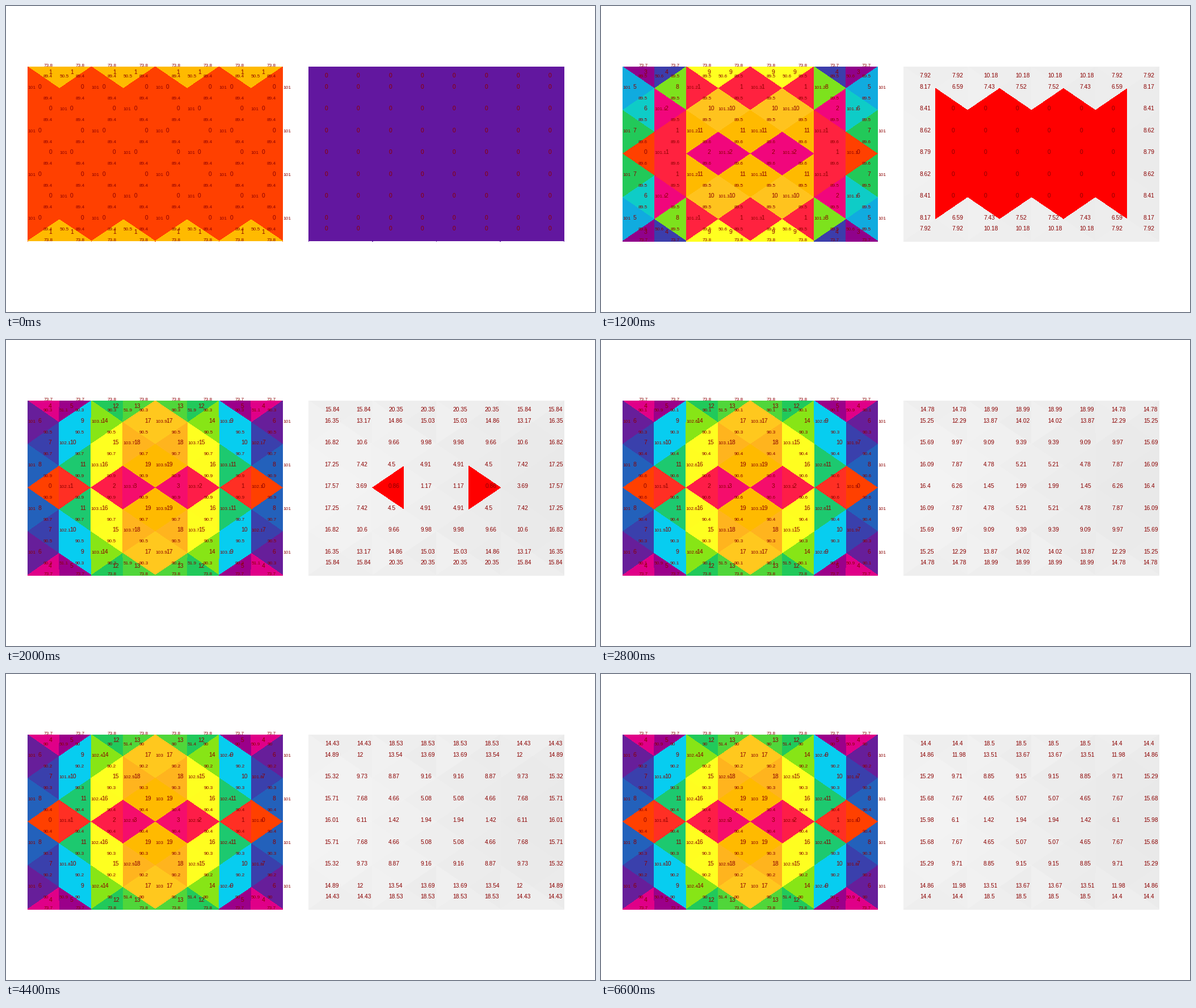
A matplotlib script that plays this animation: 1038 px wide and 540 px high, repeating every 7600 ms.

```python
import numpy as np
import matplotlib.pyplot as plt
from matplotlib.animation import FuncAnimation
from matplotlib.collections import PolyCollection
from matplotlib.colors import LinearSegmentedColormap, to_hex

W, H, DPI = 1038, 540, 64
FRAMES, STEP, LAST = 38, 200, 33
COLS, ROWS = 8, 9
DX, DY = 56.25, 38.5
LEFT, RIGHT, TOP = 38, 533.75, 107.2
INK = "#8b0000"

RAINBOW = LinearSegmentedColormap.from_list("groups", [
    (0, "#ff4000"), (.1, "#ff1f45"), (.2, "#ee0088"), (.27, "#92008a"),
    (.36, "#3d3baa"), (.42, "#245fba"), (.47, "#07cdf0"), (.53, "#07cdf0"),
    (.58, "#1ec96c"), (.64, "#22c958"), (.74, "#8ae614"), (.79, "#ffff20"),
    (.84, "#ffff20"), (.895, "#ffc81e"), (.947, "#ffb41e"), (1, "#ffba00"),
], N=2048)

FACES = [(c, r) for r in range(ROWS) for c in range(COLS)]


def fold(i, n):
    """Index counted from the nearer end."""
    return min(i, n - 1 - i)


def smooth(t):
    t = min(max(t, 0), 1)
    return t * t * (3 - 2 * t)


def settle(i):
    """Overshoot that fades once the mesh has risen."""
    return np.exp(-max(i - 10, 0) / 3)


def relax(i):
    return smooth((i - 5) / 5) * (1 + .45 * settle(i))


def num(v, digits):
    return f"{round(float(v), digits):g}"


def point(line, u, i):
    drift = .9 * np.sin(line * np.pi / 4) * relax(i) if 0 < u < 8 else 0
    return np.array([line * DX - drift, TOP + u * DY])


def lines_of(c):
    """Even and odd grid line beside a column."""
    return (c, c + 1) if c % 2 == 0 else (c + 1, c)


def corners(c, r):
    even, odd = lines_of(c)
    base, tip = (odd, even) if r % 2 == 0 else (even, odd)
    return [(base, max(r - 1, 0)), (base, min(r + 1, 8)), (tip, r)]


def edges(i):
    """Yield midpoint and length of every mesh edge."""
    def mid(a, b):
        return (point(*a, i) + point(*b, i)) / 2

    pull = relax(i)
    for c in range(COLS):
        m = fold(c, COLS)
        short = m < 2 and i >= 2 + 3 * m
        for u in (0, 8):
            yield mid((c, u), (c + 1, u)), 73.7 if short else 73.8
        even, odd = lines_of(c)
        for r in range(8):
            a, b = (r, r + 1) if r % 2 == 0 else (r + 1, r)
            stretch = .007 + .0015 * fold(r, 8)
            yield mid((even, a), (odd, b)), 89.4 * (1 + stretch * pull)
    for line in range(COLS + 1):
        stretch = .02 * np.sin(line * np.pi / 8)
        stops = [0, 1, 3, 5, 7, 8] if line % 2 else [0, 2, 4, 6, 8]
        for a, b in zip(stops, stops[1:]):
            yield (mid((line, a), (line, b)),
                   50.5 * (b - a) * (1 + stretch * pull))


def deviation(c, r, i):
    """Rises along the border first, then from the rim to the centre."""
    m, row = fold(c, COLS), fold(r, ROWS)
    middle = 1 + 2.6 * (m - 2.4) ** 2
    top = 18.5 - 4.1 * (m < 2)
    final = middle + (top - middle) * (1 - row / 4) ** 1.2
    if m == 0 or row < 2:
        growth = smooth((i - 2) / 8)
    else:
        growth = smooth((i - 6) / (4 + 3.5 * (row / 4) ** 4))
    return final * growth * (1 + .1 * settle(i))


def group(c, r, i):
    """Label of a face and the number of groups."""
    m, row = fold(c, COLS), fold(r, ROWS)
    if i < 2:
        return int(row == 0), 2
    if i < 5:
        return (1 + (m > 0) if row == 0 else 0), 3
    if i < 8:
        column = [(3, 5, 6, 7, 0), (4, 8, 2, 1, 1), (9, 1, 10, 11, 2)]
        return column[min(m, 2)][row], 12
    pair, side = divmod(m, 2)
    if row == 4:
        return m, 20
    return 4 + 8 * pair + (side if row == 0 else 1 + 3 * side + row), 20


def height(line, u):
    return np.sin(line * np.pi / 8) * np.sin(u * np.pi / 8) ** .6


def shade(c, r, v, i):
    if i == 0:
        return "#62179f"
    if v < 1:
        return "#ff0000"
    (b, u0), (_, u1), (t, u2) = corners(c, r)
    z0, z1 = height(b, u0), height(b, u1)
    at_tip = z0 + (z1 - z0) * (u2 - u0) / (u1 - u0)
    slope = (height(t, u2) - at_tip) / (t - b)
    return to_hex([(238 + 14 * slope * min(i / 10, 1)) / 255] * 3)


fig = plt.figure(figsize=(W / DPI, H / DPI), dpi=DPI, facecolor="white")
ax = fig.add_axes([0, 0, 1, 1])
ax.set_xlim(0, W)
ax.set_ylim(H, 0)
ax.axis("off")


def mesh():
    return ax.add_collection(
        PolyCollection([], linewidths=0, antialiaseds=False, zorder=1))


def labels(n, px):
    return [ax.text(0, 0, "", fontsize=px * 72 / DPI, color=INK, zorder=2,
                    family="Liberation Sans", ha="left", va="baseline")
            for _ in range(n)]


groups, shades = mesh(), mesh()
edge_text = labels(len(list(edges(0))), 8.2)
group_text = labels(len(FACES), 10.4)
dev_text = labels(len(FACES), 10.3)


def paint(coll, polys, colors):
    coll.set_verts(polys)
    coll.set_facecolor(colors)


def put(text, x, y, s):
    text.set_position((x, y))
    text.set_text(s)


def draw(frame):
    i = min(frame, LAST)
    polys = [np.array([point(*p, i) for p in corners(*f)]) for f in FACES]

    kinds = [group(*f, i) for f in FACES]
    paint(groups, [p + (LEFT, 0) for p in polys],
          [RAINBOW(k / (n - 1)) for k, n in kinds])
    for t, p, (k, _) in zip(group_text, polys, kinds):
        x, y = p.mean(axis=0)
        put(t, LEFT + x, y, str(k))
    for t, ((x, y), length) in zip(edge_text, edges(i)):
        put(t, LEFT + x, y, num(length, 1))

    devs = [deviation(*f, i) for f in FACES]
    paint(shades, [p + (RIGHT, 0) for p in polys],
          [shade(*f, v, i) for f, v in zip(FACES, devs)])
    for t, p, v in zip(dev_text, polys, devs):
        x, y = (p.min(axis=0) + p.max(axis=0)) / 2
        put(t, RIGHT + x, y, num(v, 2))
    return []


anim = FuncAnimation(fig, draw, frames=FRAMES, interval=STEP,
                     init_func=lambda: draw(0), repeat=True, repeat_delay=0)
plt.show()
```
